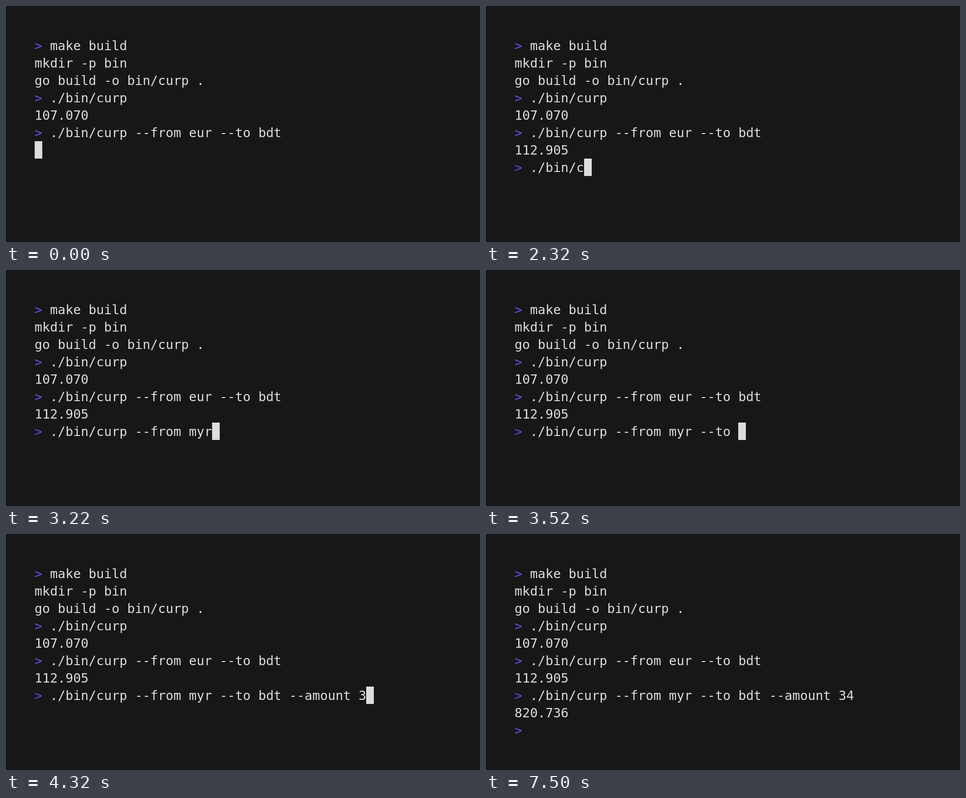
These frames come from a looping animation (1058x529 px, 8000 ms). An HTML page with a canvas:

```html
<!DOCTYPE html>
<html lang="en">
<head>
<meta charset="utf-8">
<title>Terminal session</title>
<style>
  html, body { margin: 0; width: 100%; height: 100%; overflow: hidden; background: #171717; }
  canvas { display: block; }
</style>
</head>
<body>
<canvas id="stage" width="1058" height="529"></canvas>
<script>
const ctx = document.getElementById('stage').getContext('2d');
const LOOP = 8000, LEFT = 63.8, TOP = 69, CELL = 17.22, ROW = 39, BASELINE = 30;
const PAPER = '#171717', INK = '#dddddd', PROMPT = '#5a56e0';

const history = [
  '> make build',
  'mkdir -p bin',
  'go build -o bin/curp .',
  '> ./bin/curp',
  '107.070',
  '> ./bin/curp --from eur --to bdt'
];
const command = './bin/curp --from myr --to bdt --amount 34';

// Session events, in ms
const FIRST_OUTPUT = 460, FIRST_PROMPT = 500, TYPING = 1960, ENTER = 4960, SECOND_OUTPUT = 5660;

// The blink restarts at these times and toggles every BLINK ms
const BLINK = 610, blinkStarts = [-190, FIRST_OUTPUT, 540, ENTER, SECOND_OUTPUT];

// Typing pace: [time, characters typed], linear in between
const pace = [[TYPING, 1], [2320, 7], [3220, 21], [3560, 28], [4360, command.length]];

function typedCount(t) {
  if (t < TYPING) return 0;
  const i = pace.findIndex(([time]) => time > t);
  if (i < 0) return command.length;
  const [t0, n0] = pace[i - 1], [t1, n1] = pace[i];
  return Math.floor(n0 + (n1 - n0) * (t - t0) / (t1 - t0));
}

function cursorVisible(t) {
  if (t >= TYPING && t < ENTER) return true;
  const start = Math.max(...blinkStarts.filter(s => s <= t));
  return Math.floor((t - start) / BLINK) % 2 === 0;
}

function screenAt(t) {
  const lines = [...history];
  if (t >= FIRST_OUTPUT) lines.push('112.905');
  if (t >= FIRST_PROMPT) lines.push('> ' + command.slice(0, typedCount(t)));
  if (t >= SECOND_OUTPUT) lines.push('820.736', '> ');
  const waiting = t < FIRST_PROMPT || (t >= ENTER && t < SECOND_OUTPUT);
  if (waiting) lines.push('');
  return lines;
}

function draw(t) {
  const lines = screenAt(t);
  ctx.fillStyle = PAPER;
  ctx.fillRect(0, 0, 1058, 529);
  ctx.font = '28.6px "DejaVu Sans Mono", monospace';
  lines.forEach((line, row) => {
    [...line].forEach((ch, col) => {
      ctx.fillStyle = ch === '>' ? PROMPT : INK;
      ctx.fillText(ch, LEFT + col * CELL, TOP + row * ROW + BASELINE);
    });
  });
  if (cursorVisible(t)) {
    const row = lines.length - 1;
    ctx.fillStyle = INK;
    ctx.fillRect(Math.round(LEFT + lines[row].length * CELL), TOP + row * ROW, 17, ROW);
  }
}

const start = performance.now();
function tick() {
  draw((performance.now() - start) % LOOP);
  requestAnimationFrame(tick);
}
tick();
</script>
</body>
</html>
```
